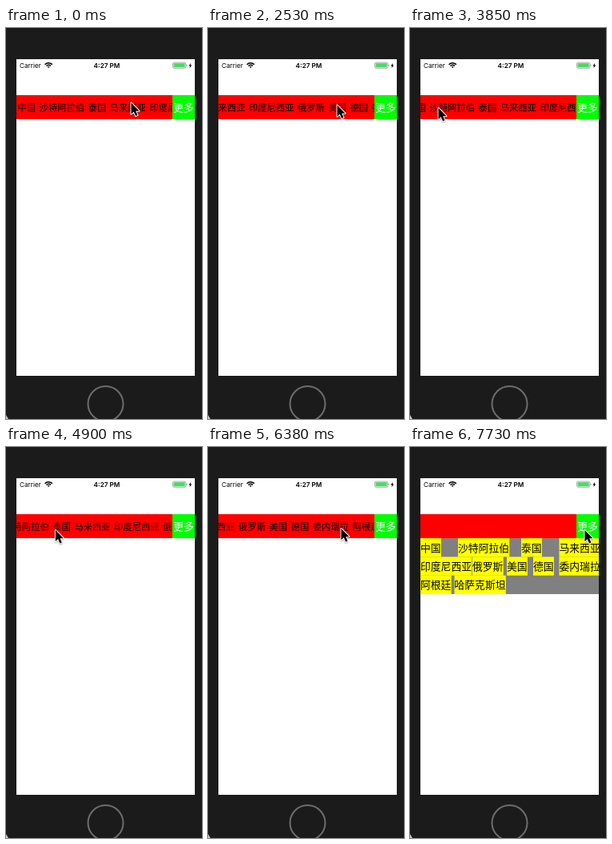
These frames come from a looping animation (245x489 px, 8000 ms). An HTML page with a canvas:

```html
<!DOCTYPE html>
<html lang="zh-CN">
<head>
<meta charset="utf-8">
<title>Scrolling tag bar</title>
<style>
html, body { margin: 0; width: 100%; height: 100%; overflow: hidden; background: #1b1b1b; }
canvas { display: block; width: 245px; height: 489px; }
</style>
</head>
<body>
<canvas id="stage"></canvas>
<script>
const W = 245, H = 489, LOOP = 8000, MENU_AT = 7730;
const TICK = 148.5, LEAD = 11; // the picture advances in even steps
const CJK = '"Noto Sans CJK SC", "Noto Sans CJK", sans-serif';
const LATIN = 'Inter, Roboto, sans-serif';
const WORDS = '中国 沙特阿拉伯 泰国 马来西亚 印度尼西亚 俄罗斯 美国 德国 委内瑞拉 阿根廷 哈萨克斯坦'.split(' ');
const BAR_SIZE = 11.3, BAR_GAP = 4.5, TAG_SIZE = 12.8;
const BAR_TOP = 84, BAR_H = 30, ROW_H = 23.35;

// Left edges of the tags in each row of the open menu
const ROWS = [[13, 60, 139, 186.5], [13, 78, 121, 154, 186.5], [13, 55.5]];

// Swipes: first tick, last tick, offset reached
const swipes = [
  [1, 1, 10], [6, 7, 67], [13, 14, 128.4], [25, 26, 17],
  [33, 37, 279.5], [41, 43, 202.3], [44, 47, -3], [48, 50, 0]
];

// Pointer moves: first tick, last tick, x and y reached
const moves = [
  [4, 4, 168, 96], [10, 11, 182, 96], [17, 17, 161, 96],
  [18, 20, 98, 107], [21, 23, 35, 99.5], [28, 29, 91, 94],
  [33, 35, 2, 122], [36, 37, 124, 110], [38, 40, 102, 93],
  [41, 43, 166, 101.5], [44, 47, 214, 138], [48, 50, 218, 103.5]
];

const linear = p => p;
const smooth = p => p * p * (3 - 2 * p);

const canvas = document.getElementById('stage');
const ctx = canvas.getContext('2d');
const dpr = window.devicePixelRatio || 1;
canvas.width = W * dpr;
canvas.height = H * dpr;

const ARROW = new Path2D('M0 0V14.2L3.2 11.2 5.6 16.6 8 15.6 5.7 10.3H10Z');
const BOLT = new Path2D('M231.2 43.8L228.4 47.5H230.1L229.4 50.3 232.3 46.5H230.6Z');
const CORNER = new Path2D('M0 484L3 489H0Z');

// Runs through the segments up to the tick, easing inside the current one
function follow(segments, value, tick, ease) {
  for (const [first, last, ...goal] of segments) {
    if (tick < first) break;
    const p = ease(Math.min(1, (tick - first + 1) / (last - first + 1)));
    value = value.map((v, i) => v + (goal[i] - v) * p);
  }
  return value;
}

function rect(color, x, y, w, h) {
  ctx.fillStyle = color;
  ctx.fillRect(x, y, w, h);
}

function clipTo(x, y, w, h) {
  ctx.save();
  ctx.beginPath();
  ctx.rect(x, y, w, h);
  ctx.clip();
}

function label(text, x, y, font, color = '#000', align = 'left') {
  ctx.font = font;
  ctx.fillStyle = color;
  ctx.textAlign = align;
  ctx.fillText(text, x, y);
}

function drawPhone() {
  rect('#1b1b1b', 0, 0, W, H);
  rect('#fff', 13, 39, 223, 396);
  ctx.strokeStyle = '#6c6c6c';
  ctx.lineWidth = 2;
  ctx.beginPath();
  ctx.arc(124.5, 470, 22, 0, Math.PI * 2);
  ctx.stroke();
  ctx.fillStyle = '#ccc';
  ctx.fill(CORNER);
}

function drawStatus() {
  label('Carrier', 17, 49.6, '8.2px ' + LATIN);
  label('4:27 PM', 126, 49.6, '600 8.2px ' + LATIN, '#000', 'center');

  const from = -Math.PI * 0.76, to = -Math.PI * 0.24;
  ctx.strokeStyle = '#000';
  ctx.lineWidth = 1.5;
  for (const r of [1.2, 3.8, 6.3]) {
    ctx.beginPath();
    ctx.arc(53.2, 50, r, from, to);
    ctx.stroke();
  }

  ctx.strokeStyle = '#8a8a8a';
  ctx.lineWidth = 0.7;
  ctx.beginPath();
  ctx.roundRect(208.4, 43.1, 16.4, 7.2, 1.8);
  ctx.stroke();
  rect('#4cd964', 209.5, 44.1, 14.2, 5.2);
  rect('#8a8a8a', 225.5, 45.6, 0.9, 2.3);
  ctx.fillStyle = '#000';
  ctx.fill(BOLT);
}

function drawBar(offset, open) {
  rect('#f00', 13, BAR_TOP, 195, BAR_H);
  if (!open) {
    clipTo(13, BAR_TOP, 195, BAR_H);
    let x = 14.5 - offset;
    for (const word of WORDS) {
      label(word, x, 103.5, BAR_SIZE + 'px ' + CJK);
      x += word.length * BAR_SIZE + BAR_GAP;
    }
    ctx.restore();
  }
  rect('#0f0', 208, BAR_TOP, 28, BAR_H);
  label('更多', 222, 103.8, TAG_SIZE + 'px ' + CJK, '#fff', 'center');
}

function drawMenu() {
  const top = BAR_TOP + BAR_H, height = ROW_H * ROWS.length;
  clipTo(13, top, 223, height);
  rect('#808080', 13, top, 223, height);
  let i = 0;
  ROWS.forEach((row, r) => {
    const y = top + r * ROW_H;
    for (const x of row) {
      const word = WORDS[i++];
      rect('#ff0', x, y, word.length * TAG_SIZE + 0.3, ROW_H);
      label(word, x, y + 16.7, TAG_SIZE + 'px ' + CJK);
    }
  });
  ctx.restore();
}

function drawPointer(x, y) {
  ctx.save();
  ctx.translate(x + 0.5, y + 0.5);
  ctx.lineJoin = 'round';
  ctx.lineWidth = 2;
  ctx.strokeStyle = '#fff';
  ctx.shadowColor = 'rgba(0,0,0,0.35)';
  ctx.shadowBlur = 2 * dpr;
  ctx.shadowOffsetY = dpr;
  ctx.stroke(ARROW);
  ctx.shadowColor = 'transparent';
  ctx.fillStyle = '#000';
  ctx.fill(ARROW);
  ctx.restore();
}

const start = performance.now();

function frame() {
  const t = (performance.now() - start) % LOOP;
  const tick = Math.floor((t + LEAD) / TICK);
  const open = t >= MENU_AT;
  const [offset] = follow(swipes, [0], tick, smooth);
  const [x, y] = follow(moves, [156, 93], tick, linear);
  ctx.setTransform(dpr, 0, 0, dpr, 0, 0);
  drawPhone();
  drawStatus();
  drawBar(offset, open);
  if (open) drawMenu();
  drawPointer(x, y);
  requestAnimationFrame(frame);
}
frame();
</script>
</body>
</html>
```
